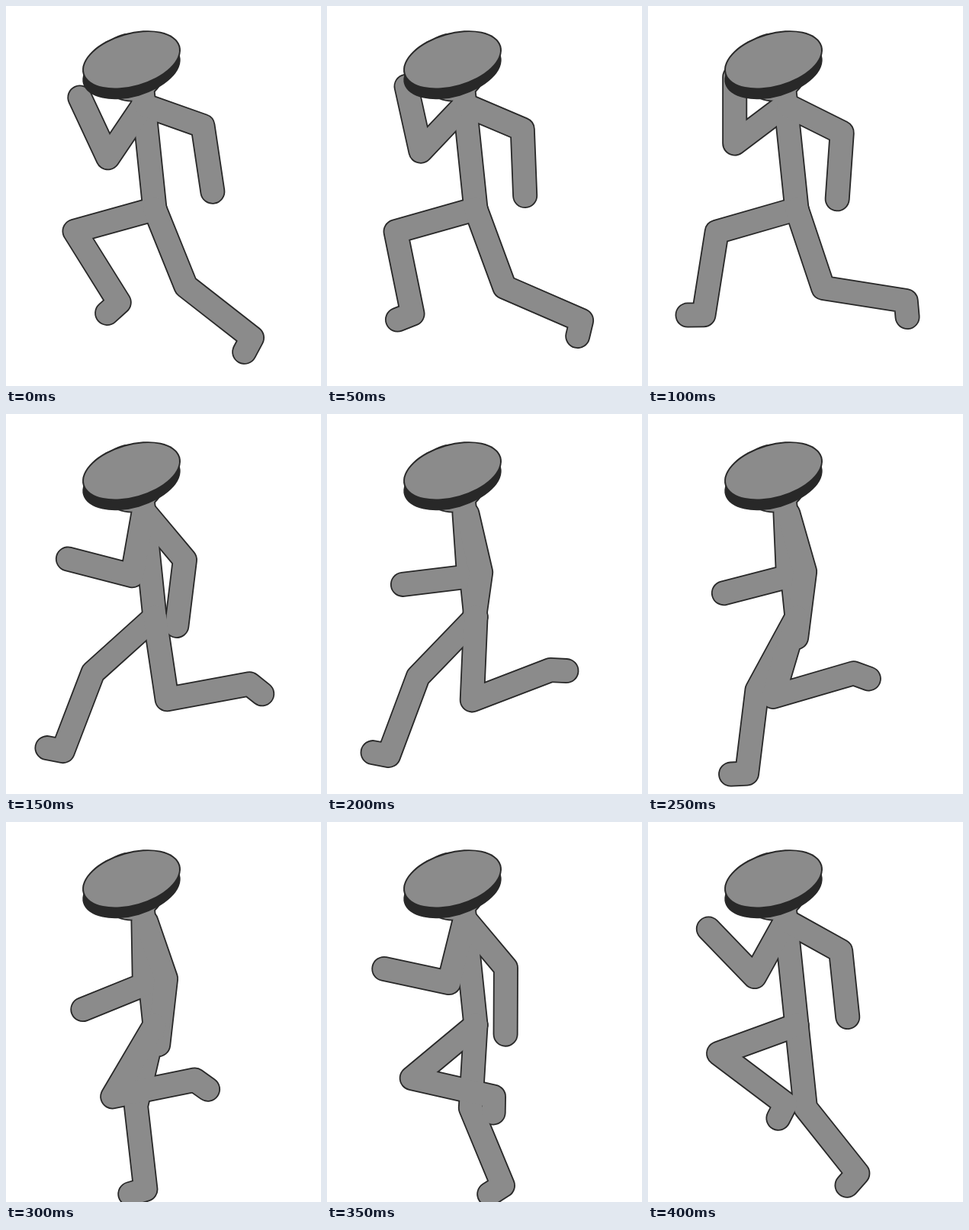
Recreate the animation shown at these times as an HTML page with a canvas. Size 413x498 px, loop 0.45 s.

```html
<!DOCTYPE html>
<html lang="en">
<head>
<meta charset="utf-8">
<title>Runner</title>
<style>
  html, body { margin: 0; width: 100%; height: 100%; overflow: hidden; background: #fff; }
  canvas { display: block; }
</style>
</head>
<body>
<canvas id="stage" width="413" height="498"></canvas>
<script>
const ctx = document.getElementById('stage').getContext('2d');
const GREY = '#8b8b8b', DARK = '#282828';
const RAD = Math.PI / 180;
const STEP_MS = 50, STEPS = 9;
const NECK = [179, 112], HIP = [195, 266];
const FRONT_SHOULDER = [180, 130], REAR_SHOULDER = [184, 131];

// Key angles in degrees: 0 hangs straight down, positive swings forward (left).
// Arms repeat every loop. A leg takes two loops, so the legs trade places.
const KEY_STEPS = [0, 2, 3, 4, 6, 8];
const frontArm = { upper: [34, 53, 10, -4, -1, 29], fore: [155, 180, 104.5, 83, 68, 136] };
const rearArm = { upper: [-70.5, -63.5, -40, -13, -19, -61], fore: [-8.5, 4, 7, 8, 6.5, -6] };
const leg = {
  thigh: [74.5, 74, 48, 44, 13, -6, -22, -18.5, -8.5, 2.5, 30.5, 70],
  shin: [-32, 9, 21, 20.5, -6.5, -38.5, -52, -81, -100.5, -111, -101.5, -53]
};

// Fractional index of a step among the key steps.
function keyPosition(step) {
  const i = KEY_STEPS.findLastIndex(key => key <= step);
  const gap = (KEY_STEPS[i + 1] ?? STEPS) - KEY_STEPS[i];
  return i + (step - KEY_STEPS[i]) / gap;
}

function sample(keys, position) {
  const i = Math.floor(position), t = position - i;
  return keys[i] * (1 - t) + keys[(i + 1) % keys.length] * t;
}

function chain(root, ...bones) {
  const joints = [root];
  let [x, y] = root;
  for (const [length, angle] of bones) {
    x -= length * Math.sin(angle * RAD);
    y += length * Math.cos(angle * RAD);
    joints.push([x, y]);
  }
  return joints;
}

function armJoints(shoulder, arm, upperLength, position) {
  return chain(shoulder,
    [upperLength, sample(arm.upper, position)],
    [87, sample(arm.fore, position)]);
}

function legJoints(position) {
  const shin = sample(leg.shin, position);
  // The foot stretches out as the shin kicks up behind.
  const kick = Math.max(0, -70 - shin);
  return chain(HIP,
    [109, sample(leg.thigh, position)],
    [110, shin],
    [21, shin + 80 - kick * kick / 30]);
}

function strokeLines(lines, width, color) {
  ctx.lineWidth = width;
  ctx.strokeStyle = color;
  for (const line of lines) {
    ctx.beginPath();
    line.forEach(([x, y]) => ctx.lineTo(x, y));
    ctx.stroke();
  }
}

function oval(x, y, rx, ry, fill, tilt = 0) {
  ctx.beginPath();
  ctx.ellipse(x, y, rx, ry, tilt, 0, Math.PI * 2);
  ctx.fillStyle = fill;
  ctx.fill();
}

function drawHat(y) {
  const x = 164.5, tilt = -16 * RAD;
  oval(x, y + 13, 66, 35.2, DARK, tilt);
  oval(x, y, 66.3, 35.4, DARK, tilt);
  oval(x, y, 64.3, 33.4, GREY, tilt);
}

function draw(step) {
  const position = keyPosition(step);
  const drop = step < 3 ? 0 : 4;
  const headY = 80.5 + drop;
  const lines = [
    [NECK, HIP],
    armJoints(FRONT_SHOULDER, frontArm, 83, position),
    armJoints(REAR_SHOULDER, rearArm, 78.5, position),
    legJoints(position),
    legJoints(position + KEY_STEPS.length)
  ];

  ctx.fillStyle = '#fff';
  ctx.fillRect(0, 0, 413, 498);
  ctx.lineCap = ctx.lineJoin = 'round';
  oval(164, headY, 45, 45, DARK);
  strokeLines(lines, 33, DARK);
  oval(164, headY, 43.2, 43.2, GREY);
  strokeLines(lines, 29.4, GREY);
  drawHat(70.8 + drop);
}

function tick() {
  draw(Math.floor(performance.now() / STEP_MS) % STEPS);
  requestAnimationFrame(tick);
}
tick();
</script>
</body>
</html>
```
